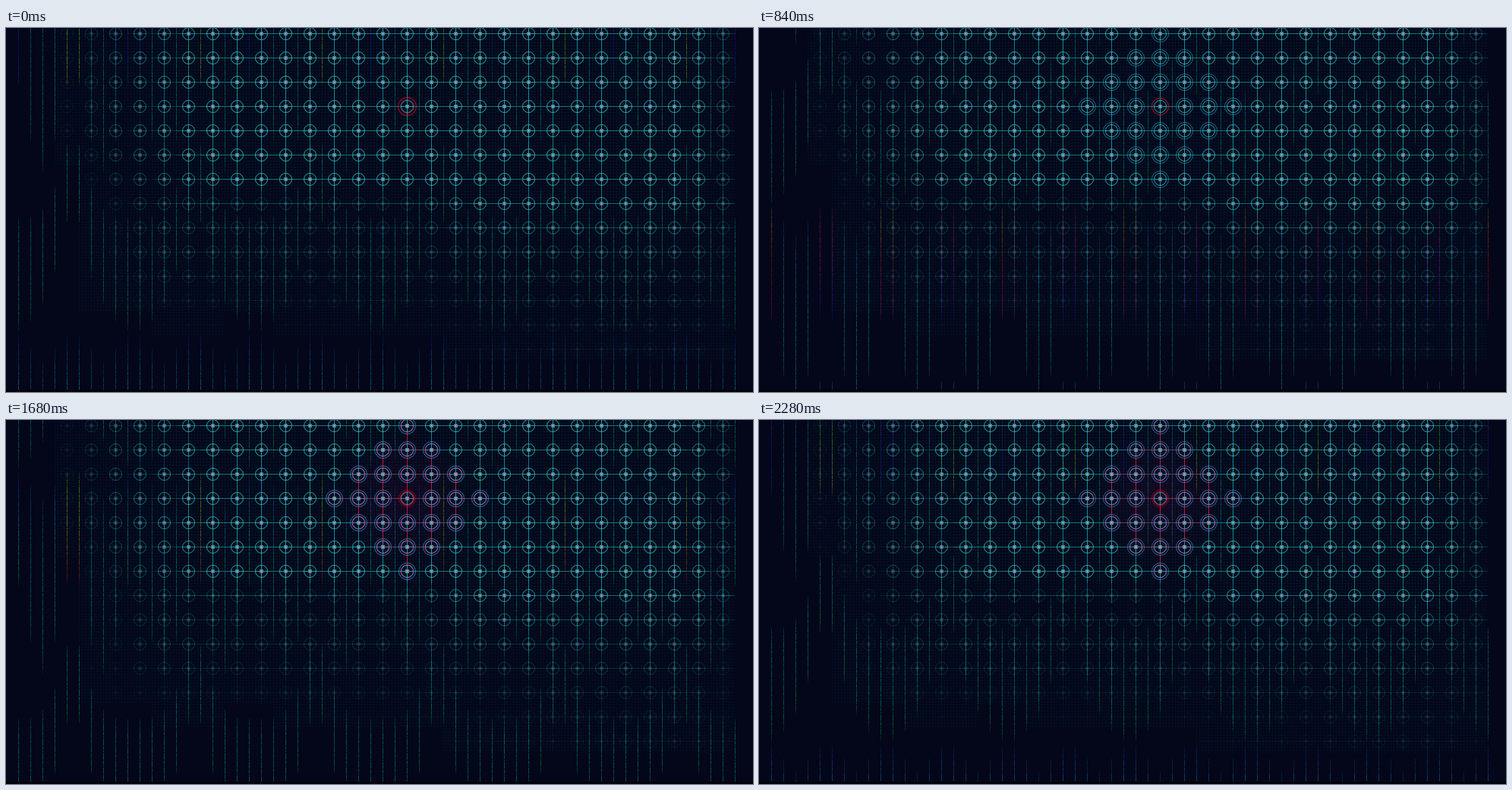
These frames come from a looping animation (984x480 px, 2400 ms). An HTML page with a canvas:

```html
<!DOCTYPE html>
<html lang="en">
<head>
<meta charset="utf-8">
<title>Node grid</title>
<style>
html, body { margin: 0; width: 100%; height: 100%; overflow: hidden; background: #030719; }
canvas { display: block; }
</style>
</head>
<body>
<canvas id="stage" width="984" height="480"></canvas>
<script>
const W = 984, H = 480, LOOP = 2400, STEP = 120, COLS = 28, ROWS = 14;
const HUB = { c: 14, r: 3 };
const ctx = document.getElementById('stage').getContext('2d');
const clamp = v => Math.max(0, Math.min(1, v));
const smooth = v => { v = clamp(v); return v * v * (3 - 2 * v); };
const nodeX = c => 80 + 32 * c;
const nodeY = r => 7 + 32 * r;

// Brightness of a node: bright upper block, fading out left, right and below
function level(c, r) {
  const left = smooth((c + 1.5 - Math.max(0, r - 4) * .5) / 8);
  const right = smooth((COLS + .7 - c) / 4);
  if (r < 7) return left * right;
  const bump = Math.exp(-(((c - 4) / 2.5) ** 2));
  const low = (.22 * left + .2 * bump) * smooth((12.8 - r) / 4);
  const high = .88 * Math.exp(-.38 * (r - 7));
  return (low + (high - low) * clamp((c - 14) / (r - 4))) * right;
}

function ring(g, x, y, radius, color, alpha) {
  g.globalAlpha = alpha;
  g.strokeStyle = color;
  g.beginPath();
  g.arc(x + .5, y + .5, radius, 0, 7);
  g.stroke();
}

function box(g, x, y, w, h, color, alpha) {
  g.globalAlpha = alpha;
  g.fillStyle = color;
  g.fillRect(x, y, w, h);
}

function eachNode(fn) {
  for (let r = 0; r < ROWS; r++)
    for (let c = 0; c < COLS; c++) {
      const v = level(c, r);
      if (v > .02) fn(nodeX(c), nodeY(r), v, c, r);
    }
}

// The still part of the picture
const field = document.createElement('canvas');
field.width = W;
field.height = H;
const fg = field.getContext('2d');
eachNode((x, y, v, c, r) => {
  const mesh = .035 + .03 * v;
  for (let i = -16; i < 16; i += 4) {
    box(fg, x + i, y - 16, 1, 32, '#1a9aa8', mesh);
    box(fg, x - 16, y + i, 32, 1, '#1a9aa8', mesh);
  }
  const bar = r === 7 ? Math.max(v, .6) : v;
  const wire = bar * clamp((c - 2) / 4) * .7;
  box(fg, x - 16, y, 32, 1, '#23a0a2', wire);
  box(fg, x, y - 16, 1, r === 7 && c < 16 ? 27 : 32, '#22a8b8', wire);
});
eachNode((x, y, v) => {
  box(fg, x - 8, y, 17, 1, '#2bbcc0', v * .5);
  box(fg, x, y - 8, 1, 17, '#2bbcc0', v * .5);
  ring(fg, x, y, 8, '#27c4c2', v * .85);
  box(fg, x - 2, y - 2, 5, 5, '#7fa8c4', v * .65);
  box(fg, x, y, 1, 1, '#c8eef4', v * .6);
});

function streak(x, top, length, hue, spread, alpha) {
  const bottom = top + length;
  if (bottom < 0 || top > H) return;
  const grad = ctx.createLinearGradient(0, top, 0, bottom);
  for (let p = 0; p <= 1; p += .125) {
    const h = (hue + spread * (1 - 2 * p) + 720) % 360;
    const a = alpha * (.35 + .65 * smooth(8 * Math.min(p, 1 - p)));
    grad.addColorStop(p, `hsla(${h}, 90%, 42%, ${a})`);
  }
  ctx.strokeStyle = grad;
  ctx.beginPath();
  ctx.moveTo(x + .5, top);
  ctx.lineTo(x + .5, bottom);
  ctx.stroke();
}

// Columns mirror within every ten; two streaks rise through each in one loop.
// In the outermost kinds the long streak runs through the colour wheel.
function rain(t) {
  ctx.globalAlpha = 1;
  ctx.setLineDash([9, 1, 5, 1, 2, 1]);
  for (let k = 1; k <= 60; k++) {
    const j = k % 10, kind = Math.max(0, Math.min(j - 1, 10 - j));
    const arch = Math.sin(Math.PI * kind / 4);
    const turn = kind % 4 ? 0 : 520 - 48 * kind;
    for (let wrap = 0; wrap < 3; wrap++) {
      const life = t / LOOP + 1 - wrap, y = (1 - life) * H;
      const hue = 180 + turn * Math.max(0, Math.min(life, .85));
      streak(16 * k, y - 75 + 35 * arch * arch, 150 + 80 * arch, hue, turn ? 50 : 25, turn ? .42 : .36);
      streak(16 * k, y + 250 - 1.5 * kind ** 3, 150 - 12 * kind, 165, 18, .36);
    }
  }
  ctx.setLineDash([]);
}

// The diamond around the hub: it spreads, cools down, then heats up and breathes
function pulse(s) {
  const reach = Math.min(3, s);
  const hot = (s > 0 && s < 5) || s > 8;
  const beat = Math.cos((s - 14) * Math.PI / 3);
  const outer = s > 5 ? .7 + .25 * beat : 0;
  const inner = s > 8 ? .65 + .3 * beat : 0;
  const hx = nodeX(HUB.c), hy = nodeY(HUB.r);

  if (hot) {
    const glow = ctx.createRadialGradient(hx, hy, 5, hx, hy, 90);
    glow.addColorStop(0, 'rgba(130, 0, 70, .12)');
    glow.addColorStop(1, 'rgba(130, 0, 70, 0)');
    box(ctx, hx - 90, hy - 90, 180, 180, glow, 1);
  }
  for (let dx = -reach; dx <= reach; dx++) {
    const span = reach - Math.abs(dx);
    for (let dy = -span; dy <= span; dy++) {
      const x = hx + 32 * dx, y = hy + 32 * dy;
      if (hot) {
        if (dy < span) box(ctx, x, y + 9, 1, 15, '#f0002c', .8);
        if (dx < reach - Math.abs(dy)) box(ctx, x + 9, y, 15, 1, '#d80038', .5);
        box(ctx, x - 2, y - 2, 5, 5, '#c890b8', .3);
      }
      if (!dx && !dy) continue;
      ring(ctx, x, y, 11, '#2592c4', outer * .85);
      ring(ctx, x, y, 8.5, '#e52aa4', inner * .85);
    }
  }
  const cool = s > 5;
  ring(ctx, hx, hy, cool ? 11 : 12, '#e00828', s > 8 ? .5 : .9);
  ring(ctx, hx, hy, 9, '#e00838', cool ? inner : .5);
}

function draw(now) {
  const s = Math.floor(now % LOOP / STEP);
  box(ctx, 0, 0, W, H, '#030719', 1);
  rain(s * STEP);
  ctx.globalAlpha = 1;
  ctx.drawImage(field, 0, 0);
  pulse(s);
  box(ctx, 0, H - 3, W, 3, '#010208', 1);
}

const start = performance.now();
function tick() {
  draw(performance.now() - start);
  requestAnimationFrame(tick);
}
tick();
</script>
</body>
</html>
```
